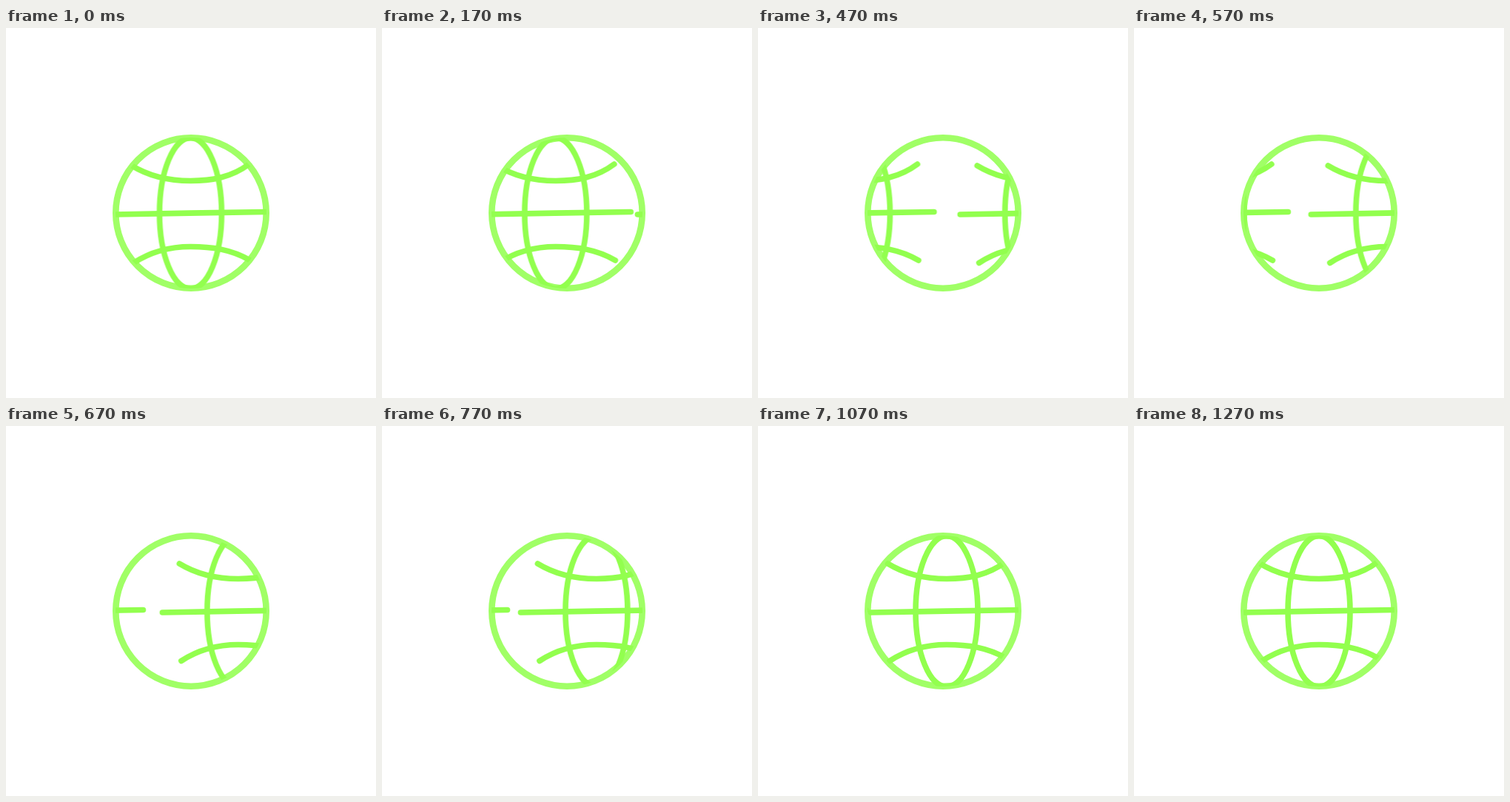
An HTML page without scripts for the animation above (2 s loop, 500 by 500 pixels).

```html
<!DOCTYPE html>
<html lang="en">
<head>
<meta charset="utf-8">
<title>Spinning globe</title>
<style>
  html, body { margin: 0; width: 100%; height: 100%; overflow: hidden; background: #fff; }
  svg { display: block; width: 100vw; height: 100vh; }
  .grid { fill: none; stroke: #92ff4e; stroke-width: 7.6; stroke-linecap: round; }
  .rim { fill: none; stroke: #a0ff66; stroke-width: 8.6; }
  .leaving { animation: leave 2s linear infinite; }
  .arriving { animation: arrive 2s linear infinite; }

  @keyframes leave {
    0% { transform: translateX(0); }
    3.5% { transform: translateX(-2.5px); }
    8.5% { transform: translateX(-15px); }
    12.5% { transform: translateX(-36px); }
    16.5% { transform: translateX(-64px); }
    20.5% { transform: translateX(-93px); }
    24.5% { transform: translateX(-120px); }
    28.5% { transform: translateX(-143px); }
    33.5% { transform: translateX(-166px); }
    38.5% { transform: translateX(-182px); }
    45% { transform: translateX(-196px); }
    52.5% { transform: translateX(-205px); }
    63.5%, 100% { transform: translateX(-212px); }
  }
  @keyframes arrive {
    0% { transform: translateX(212px); }
    3.5% { transform: translateX(208px); }
    8.5% { transform: translateX(198px); }
    12.5% { transform: translateX(187px); }
    16.5% { transform: translateX(170px); }
    20.5% { transform: translateX(147px); }
    24.5% { transform: translateX(119px); }
    28.5% { transform: translateX(92px); }
    33.5% { transform: translateX(64px); }
    38.5% { transform: translateX(40px); }
    45% { transform: translateX(19px); }
    53.5% { transform: translateX(5px); }
    58.5% { transform: translateX(1.5px); }
    63.5%, 100% { transform: translateX(0); }
  }
</style>
</head>
<body>
<svg viewBox="0 0 500 500">
  <defs>
    <clipPath id="disc"><circle cx="250" cy="250" r="102"/></clipPath>
    <g id="lines">
      <ellipse cx="250" cy="250.5" rx="42" ry="102"/>
      <path d="M147.5 252 C200 250.5 300 249.5 351.5 248.5"/>
      <path d="M170.5 186 C195 201 222 206.5 250 206.5 S305 202 329 184"/>
      <path d="M173 317.5 C195 303 222 295.5 250 295.5 S305 299 330.5 314"/>
    </g>
  </defs>
  <circle class="rim" cx="250" cy="250" r="101.7"/>
  <g class="grid" clip-path="url(#disc)">
    <use class="leaving" href="#lines"/>
    <use class="arriving" href="#lines"/>
  </g>
</svg>
</body>
</html>
```
